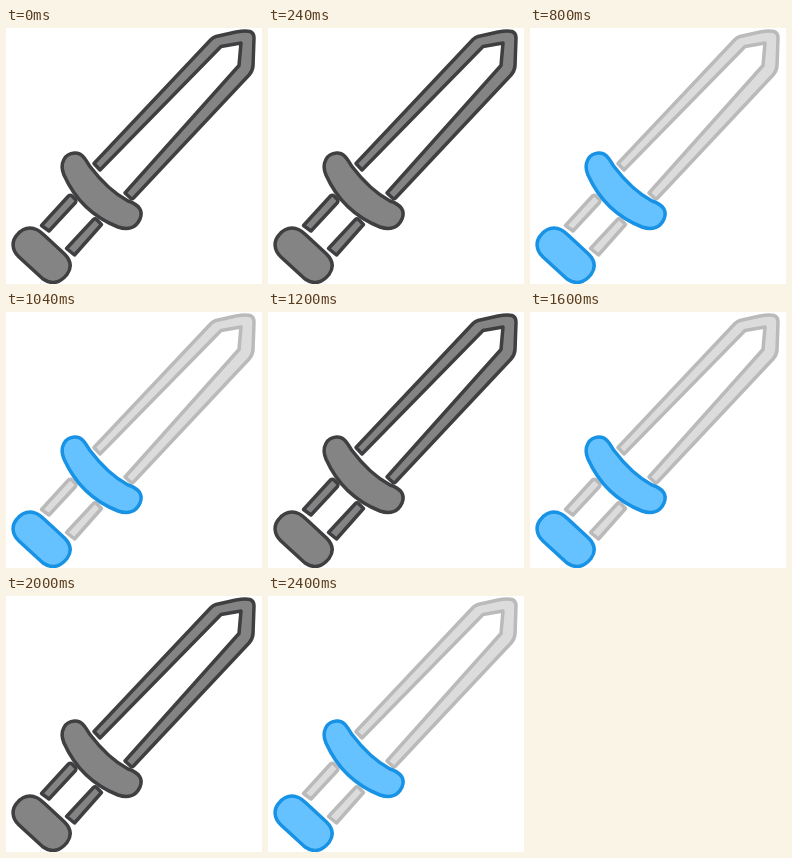
Write an HTML page that moves like this. It is 256 px wide and 256 px high and loops after 2800 ms.

```html
<!DOCTYPE html>
<html lang="en">
<head>
<meta charset="utf-8">
<title>Sword</title>
<style>
  html, body { margin: 0; width: 100%; height: 100%; overflow: hidden; background: #fff; }
  svg { display: block; width: 100vw; height: 100vh; }
  path { stroke-width: 3.5; stroke-linejoin: round; }
  .gray { fill: #848484; stroke: #3f3f41; }
  .light { fill: #dcdcdc; stroke: #bababa; }
  .blue { fill: #66c2ff; stroke: #1892e4; }
</style>
</head>
<body>
<svg viewBox="0 0 256 256">
  <g id="steel">
    <path d="M88 135.500 L205 11.500 Q207 9.500 210 8.500 L230 4 Q239 2.500 244 3.500 Q248 5 248 10 L247 38 Q246.500 43 243 47 L127.500 170 Q126 171.500 124.500 170 L119 165 L233 37.500 L235 15 L215 18.500 L94 142 Z"/>
    <path d="M35.500 197.500 L62.500 168 Q64.500 166.500 66 168 L69.500 171.500 Q70.500 173 69.500 174.500 L43 203 Z"/>
    <path d="M60.500 220.500 L87.500 191.500 Q89 190 90.500 191.500 L95.500 196.500 L68.500 227 Z"/>
  </g>
  <g id="fittings">
    <path d="M68.500 125 C76 124.500 79 131 84 138.500 C95 153 107 165 122 173 C133 176.500 137.500 183 134 191 C130 200 122 202.500 112 199 C88 189.500 69 171.500 58 147 C53 135 59 125.500 68.500 125 Z"/>
    <path d="M24 200 C30 200 34 203 38 207 L58.500 226 C65.500 233 66 239.500 61 246.500 C54 255 46 257 37 251 L13 229 C5.500 222 5.500 213 11 207 C15 202 19 200 24 200 Z"/>
  </g>
</svg>
<script>
  const STEP = 400;
  const dark = ["gray", "gray"], lit = ["light", "blue"];
  // Each pose holds the colours of the steel and the fittings.
  const poses = [dark, ["gray", "blue"], lit, dark, lit, dark, lit];
  const parts = ["steel", "fittings"].map(id => document.getElementById(id));

  function draw() {
    const pose = poses[Math.floor(performance.now() / STEP) % poses.length];
    parts.forEach((part, i) => part.setAttribute("class", pose[i]));
    requestAnimationFrame(draw);
  }
  draw();
</script>
</body>
</html>
```
